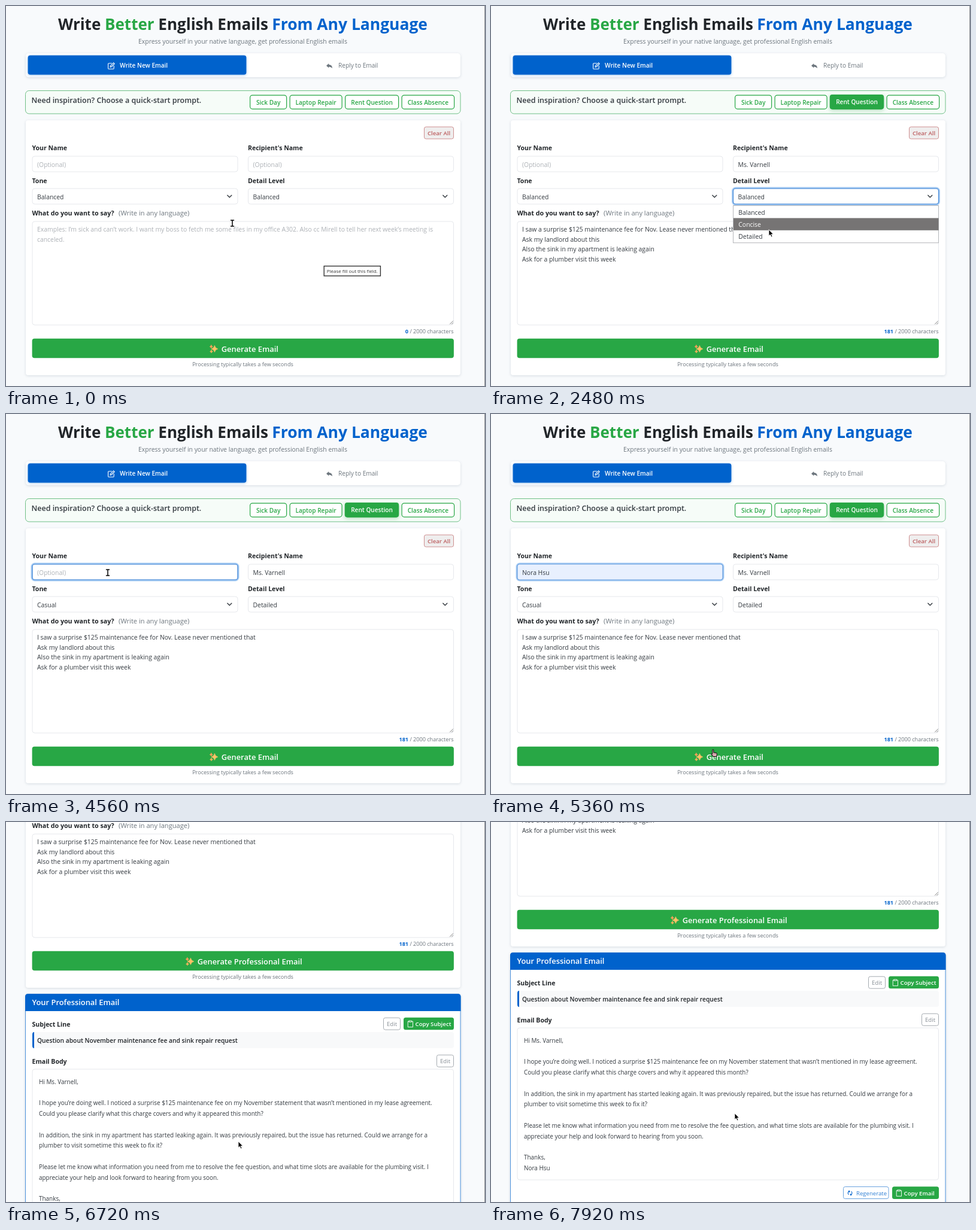
Write an HTML page that moves like this. It is 800 px wide and 635 px high and loops after 8000 ms.

```html
<!DOCTYPE html>
<html lang="en">
<head>
<meta charset="utf-8">
<title>Email writer</title>
<style>
  html, body { margin: 0; width: 100%; height: 100%; overflow: hidden; background: #f8fafc; }
  svg { display: block; width: 800px; height: 635px; }
  text { font-family: "Open Sans", "Noto Sans", sans-serif; white-space: pre; }
  .card { filter: drop-shadow(0 1px 2px rgba(40, 60, 90, .16)); }
  .tab { filter: drop-shadow(0 1px 2px rgba(0, 98, 204, .35)); }
  .lift { filter: drop-shadow(0 2px 3px rgba(40, 167, 69, .35)); }
</style>
</head>
<body>
<svg id="stage" viewBox="0 0 800 635" xmlns="http://www.w3.org/2000/svg"></svg>
<script>
const LOOP = 8000;
const BLUE = '#0062cc', GREEN = '#28a745', INK = '#212529', TEXT = '#343a40', GRAY = '#6c757d', PALE = '#adb1b6', LINE = '#e6e8ec';
const SENDER = 'Nora Hsu', RECIPIENT = 'Ms. Varnell';

const rect = (x, y, w, h, fill, r = 0, stroke = 'none', extra = '') =>
  `<rect x="${x}" y="${y}" width="${w}" height="${h}" rx="${r}" fill="${fill}" stroke="${stroke}" ${extra}/>`;
const text = (x, y, s, size = 10.4, fill = TEXT, weight = 400, anchor = 'start') =>
  `<text x="${x}" y="${y}" font-size="${size}" fill="${fill}" font-weight="${weight}" text-anchor="${anchor}">${s}</text>`;
const span = (s, fill, weight) => `<tspan fill="${fill}"${weight ? ` font-weight="${weight}"` : ''}>${s}</tspan>`;
const path = (d, fill, stroke = 'none', w = 1) =>
  `<path d="${d}" fill="${fill}" stroke="${stroke}" stroke-width="${w}" stroke-linejoin="round" stroke-linecap="round"/>`;
const at = (x, y, s) => `<g transform="translate(${x} ${y})">${s}</g>`;
const group = (id, s) => `<g id="${id}">${s}</g>`;

const label = (x, y, s) => text(x, y, s, 10.55, INK, 700);
const field = (x, y) => rect(x + .5, y + .5, 343, 26, '#fff', 4, LINE);
const chevron = (x, y) => path(`M${x - 3.5} ${y - 1.8}l3.5 3.5l3.5 -3.5`, 'none', TEXT, 1.4);
const ring = (id, x, y, w, h) => group(id,
  rect(x - .5, y - .5, w + 2, h + 2, 'none', 5, '#a9cdf3', 'stroke-width="3"') +
  rect(x + .5, y + .5, w, h, 'none', 4, '#4488d8', 'stroke-width="1.2"'));
const chip = (x, w, s) => rect(x + .6, 149.1, w, 23, '#fff', 4, GREEN, 'stroke-width="1.2"') +
  text(x + w / 2 + .6, 164.7, s, 10.1, GREEN, 600, 'middle');
const edit = (x, y) => rect(x + .5, y + .5, 28, 20, '#fff', 3, '#a5abb1') +
  text(x + 14.5, y + 14.2, 'Edit', 9.6, '#868d94', 400, 'middle');
const clip = path('M2.5 1.5H.7V11H9V1.5H7.2M2.7 .5h4.3v2h-4.3z', 'none', '#fff', .9);
const copy = (x, y, w, s) => rect(x, y, w, 20.6, GREEN, 3.5) + at(x + 6.5, y + 5, clip) +
  text(x + 19.5, y + 14.2, s, 9.7, '#fff', 600);

const star = (x, y, r, c) => path(`M${x} ${y - r}Q${x + r * .18} ${y - r * .18} ${x + r} ${y}Q${x + r * .18} ${y + r * .18} ${x} ${y + r}` +
  `Q${x - r * .18} ${y + r * .18} ${x - r} ${y}Q${x - r * .18} ${y - r * .18} ${x} ${y - r}Z`, c, c, .7);
const sparkle = star(8.4, 7, 5.4, '#ffc267') + star(2.8, 3.2, 2.6, '#ff9f5a') + star(3, 11.4, 2.4, '#ffb45e');
const action = (id, x, s) => group(id, at(x, 566, sparkle) + text(x + 19.7, 578, s, 12.9, '#fff', 600));

const menu = (id, x, items) => group(id,
  rect(x + .5, 333.5, 343, items.length * 20.4 + 1, '#fff', 0, '#b4b6ba') +
  items.map((s, i) => rect(x + 1, 334 + i * 20.4, 342.5, 20.4, '#767474', 0, 'none', `id="${id}Bar${i}"`) +
    `<g id="${id}Item${i}">${text(x + 9.3, 348.6 + i * 20.4, s, 10.4, 'inherit')}</g>`).join(''));

const notes = ['I saw a surprise $125 maintenance fee for Nov. Lease never mentioned that', 'Ask my landlord about this',
  'Also the sink in my apartment is leaking again', 'Ask for a plumber visit this week'];
const letter = [`Hi ${RECIPIENT},`, '',
  'I hope you’re doing well. I noticed a surprise $125 maintenance fee on my November statement that wasn’t mentioned in my lease agreement.',
  'Could you please clarify what this charge covers and why it appeared this month?', '',
  'In addition, the sink in my apartment has started leaking again. It was previously repaired, but the issue has returned. Could we arrange for a',
  'plumber to visit sometime this week to fix it?', '',
  'Please let me know what information you need from me to resolve the fee question, and what time slots are available for the plumbing visit. I',
  'appreciate your help and look forward to hearing from you soon.', '', 'Thanks,', SENDER];
const details = ['Balanced', 'Concise', 'Detailed'];
const tones = ['Balanced', 'Casual', 'Formal', 'Enthusiastic', 'Reserved', 'Assertive'];

const header =
  text(87, 39.5, 'Write ' + span('Better', GREEN) + ' English Emails', 26, INK, 700) +
  text(704, 39.5, 'From Any Language', 26.45, BLUE, 700, 'end') +
  text(395.5, 63.3, 'Express yourself in your native language, get professional English emails', 10.4, GRAY, 400, 'middle') +
  rect(33, 79, 726, 40, '#fff', 5, 'none', 'class="card"') +
  rect(36.6, 82.6, 364.8, 32.1, BLUE, 4, 'none', 'class="tab"') +
  at(170, 94.5, path('M6.5 1.2H2Q.6 1.2 .6 2.6V9.4Q.6 10.8 2 10.8H8.8Q10.2 10.8 10.2 9.4V5.6M4 7.6L4.6 5.4L9.6 .4L11.2 2L6.2 7Z', 'none', '#fff', 1.1)) +
  text(190, 103.2, 'Write New Email', 10.1, '#fff', 600) +
  at(535, 95.5, path('M0 4.2L4.2 .4V2.6Q9.8 2.6 10 8.6Q8 5.8 4.2 5.9V8Z', GRAY)) +
  text(555, 103.2, 'Reply to Email', 10.1, GRAY, 500) +
  rect(32.5, 141.5, 726.5, 38.5, '#f6fcf8', 6, '#6fbf86') +
  text(42.5, 161.7, 'Need inspiration? Choose a quick-start prompt.', 12.48, TEXT, 600) +
  chip(407, 61, 'Sick Day') + chip(473.5, 87, 'Laptop Repair') + chip(566, 89, 'Rent Question') + chip(660.5, 87.5, 'Class Absence') +
  group('rentOn', rect(565.8, 148.1, 90.2, 24.5, GREEN, 4, 'none', 'class="lift"') + text(611, 164.3, 'Rent Question', 10.1, '#fff', 600, 'middle'));

const form =
  rect(33, 191, 726, 426, '#fff', 4, 'none', 'class="card"') +
  rect(698.5, 202, 49, 20, '#efeeee', 3, '#cf8f90') + text(723, 216, 'Clear All', 9.6, '#bd5f60', 600, 'middle') +
  label(43.5, 241.2, 'Your Name') + label(404, 241.2, 'Recipient\'s Name') + label(43.5, 295.8, 'Tone') + label(404, 295.8, 'Detail Level') +
  field(43.5, 250.5) + field(404, 250.5) + field(43.5, 304.5) + field(404, 304.5) +
  ring('nameRing', 43.5, 250.5, 343, 26) + rect(44.6, 251.6, 341.8, 24.8, '#e8f0fe', 3, 'none', 'id="nameFill"') +
  group('nameEmpty', text(52, 268.6, '(Optional)', 10.4, PALE)) + group('nameText', text(52, 268.6, SENDER)) +
  group('toEmpty', text(412.5, 268.6, '(Optional)', 10.4, PALE)) + group('toText', text(412.5, 268.6, RECIPIENT)) +
  ring('toneRing', 43.5, 304.5, 343, 26) + ring('detailRing', 404, 304.5, 343, 26) +
  '<text id="tone" x="52" y="322.9" font-size="10.4" fill="#343a40"/><text id="detail" x="412.5" y="322.9" font-size="10.4" fill="#343a40"/>' +
  chevron(373.3, 318) + chevron(733.3, 318) +
  text(43.5, 349.8, 'What do you want to say?', 10.7, INK, 700) +
  text(306.3, 349.8, '(Write in any language)', 11.1, GRAY, 400, 'end') +
  rect(44, 360, 703.5, 173, '#fff', 4, LINE) + ring('noteRing', 43.5, 359.5, 703.5, 173) +
  path('M741.5 531.5l5 -5M744.5 531.5l2 -2', 'none', '#777', .9) +
  group('noteEmpty', text(52, 377, 'Examples: I’m sick and can’t work. I want my boss to fetch me some files in my office A302. Also cc Mirell to tell her next week’s meeting is', 10.4, PALE) +
    text(52, 393.6, 'canceled.', 10.4, PALE)) +
  group('noteText', notes.map((s, i) => text(52, 377 + i * 16.6, s)).join('')) +
  group('count0', text(747.5, 547.4, span('0', BLUE, 700) + ' / 2000 characters', 9.1, GRAY, 400, 'end')) +
  group('count1', text(747.5, 547.4, span('181', BLUE, 700) + ' / 2000 characters', 9.1, GRAY, 400, 'end')) +
  rect(43.6, 555.7, 704.3, 32.6, GREEN, 4) + action('go', 340, 'Generate Email') + action('goPro', 300, 'Generate Professional Email') +
  text(395.5, 602.3, 'Processing typically takes a few seconds', 9.1, GRAY, 400, 'middle') +
  menu('details', 404, details) + menu('tones', 43.5, tones);

const result = group('result',
  rect(32.5, 627.5, 726.5, 440, '#fff', 4, '#4d92dc', 'class="card"') +
  path('M32 656V632Q32 627.3 36.5 627.3H755Q759.5 627.3 759.5 632V656Z', BLUE) +
  text(43.5, 646.4, 'Your Professional Email', 12.9, '#fff', 600) +
  label(43.5, 681.6, 'Subject Line') + edit(630, 666.7) + copy(664, 666.7, 84, 'Copy Subject') +
  rect(44, 691, 704, 27, '#f8f9fa', 4) + path('M47 691Q44 691 44 695V714Q44 718 47 718Z', BLUE) +
  text(52, 708.7, 'Question about November maintenance fee and sink repair request', 10.26, INK, 600) +
  label(43.5, 743.8, 'Email Body') + edit(719, 728.8) +
  rect(44, 753, 703.5, 254, '#fff', 4, LINE) +
  letter.map((s, i) => text(55, 777.8 + i * 17.75, s, 9.94)).join('') +
  rect(588.5, 1018.5, 75.5, 20, '#fff', 3, '#6aa3df') +
  at(596, 1024.5, path('M1.2 6.8A3.2 3.2 0 0 1 2.6 1.4M6 2.2A3.2 3.2 0 0 1 4.6 7.6M1.4 .8L3 1.3L2.4 3M5.8 8.2L4.2 7.7L4.8 6', 'none', BLUE, 1.1)) +
  text(610, 1032.6, 'Regenerate', 9.6, '#2f7fd4') + copy(670, 1018.3, 78, 'Copy Email'));

const tip = group('tip', rect(531.2, 434.6, 94.2, 16.4, '#fff', 0, '#333', 'stroke-width="1.4"') +
  text(535.8, 445.7, 'Please fill out this field.', 7.95, '#333'));
const cursors = group('arrow', path('M0 0V10.2L2.4 8L4.2 12L6 11.2L4.2 7.4H7.4Z', '#000', '#fff', .8)) +
  group('beam', path('M-2.5 -5H2.5M0 -5V5M-2.5 5H2.5', 'none', '#000', 1.5)) +
  group('hand', path('M-.2 .4Q1 -.6 1.8 .4V4.6L6.6 5.6Q7.6 6 7.4 7.6L6.6 11.6H1.4L-2 7.6Q-2 6 -.2 7Z', '#d9a9b0', '#222', 1.1));

const stage = document.getElementById('stage');
stage.innerHTML = group('page', header + form + result) + tip + rect(799, 0, 1, 635, '#8f9296') + group('cursor', cursors);
const $ = id => document.getElementById(id);
const show = (id, on) => $(id).setAttribute('display', on ? 'inline' : 'none');

// time, x, y
const route = [[0, 378, 363], [80, 395, 345], [560, 612, 162], [720, 612, 162], [1120, 535, 294], [1360, 494, 317], [1600, 494, 317],
  [2000, 465, 327], [2240, 465, 327], [2480, 464, 374], [2640, 463, 386], [2800, 463, 386], [3280, 218, 316], [3440, 216, 316],
  [3520, 213, 328], [3760, 205, 362], [3920, 205, 362], [4400, 170, 265], [4640, 170, 265], [4800, 165, 288], [4960, 165, 288],
  [5360, 370, 561], [5680, 378, 567], [6480, 378, 567], [6720, 388, 534], [7360, 390, 530], [7920, 407, 487], [8000, 407, 487]];
const ease = k => k * k * (3 - 2 * k);
const ramp = (t, a, b) => ease(Math.min(1, Math.max(0, (t - a) / (b - a))));

function pointer(t) {
  const i = route.findIndex((p, n) => n && t <= p[0]);
  const [a, ax, ay] = route[i - 1], [b, bx, by] = route[i], k = ramp(t, a, b);
  return [ax + (bx - ax) * k, ay + (by - ay) * k];
}

function drawMenu(id, count, open, y) {
  // the pointer's tip sits a little below the row it picks
  const active = Math.max(0, Math.min(count - 1, Math.floor((y - 336) / 20.4)));
  show(id, open);
  for (let i = 0; i < count; i++) {
    show(id + 'Bar' + i, i === active);
    $(id + 'Item' + i).setAttribute('fill', i === active ? '#fff' : TEXT);
  }
}

function draw(t) {
  const [x, y] = pointer(t), within = (a, b) => t >= a && t < b;
  const filled = t >= 720, named = t >= 4880, done = t >= 6520;
  const scroll = 340 * ramp(t, 6500, 6700) + 69 * ramp(t, 7340, 7620);

  $('page').setAttribute('transform', `translate(0 ${-scroll})`);
  show('tip', t < 160);
  show('rentOn', t >= 500);
  for (const [id, on] of [['noteEmpty', !filled], ['noteText', filled], ['count0', !filled], ['count1', filled],
    ['toEmpty', !filled], ['toText', filled], ['nameEmpty', !named], ['nameText', named], ['nameFill', named],
    ['noteRing', within(720, 1840)], ['detailRing', within(1840, 3360)], ['toneRing', within(3360, 4480)],
    ['nameRing', within(4480, 5600)], ['go', !done], ['goPro', done], ['result', done]]) show(id, on);
  $('detail').textContent = details[t < 2800 ? 0 : 2];
  $('tone').textContent = tones[t < 3920 ? 0 : 1];
  drawMenu('details', 3, within(1840, 2800), y);
  drawMenu('tones', 6, within(3360, 3920), y);

  const beam = t < 80 || within(4300, 4700), hand = within(460, 800) || within(5320, 6520);
  show('beam', beam);
  show('hand', hand);
  show('arrow', !beam && !hand);
  $('cursor').setAttribute('transform', `translate(${x} ${y})`);
}

const start = performance.now();
function frame() {
  draw((performance.now() - start) % LOOP);
  requestAnimationFrame(frame);
}
frame();
</script>
</body>
</html>
```
